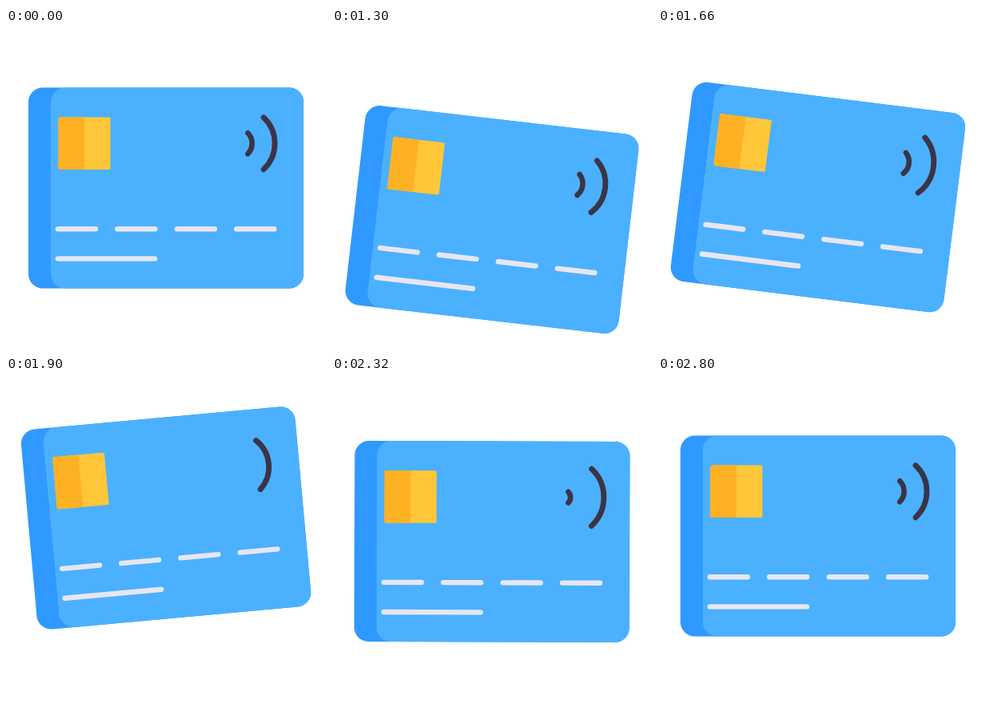
Recreate the animation shown at these times as an HTML page. Size 400 px wide and 400 px high, loop 2.83 s.

```html
<!DOCTYPE html>
<html>
<head>
<meta charset="utf-8">
<title>Card</title>
<style>
  html, body { margin: 0; width: 100%; height: 100%; overflow: hidden; background: #fff; }
  svg { display: block; width: 100%; height: 100%; }
</style>
</head>
<body>
<svg viewBox="0 0 400 400">
  <g id="card">
    <rect x="28" y="74.5" width="344" height="251" rx="18" fill="#3099ff"/>
    <rect x="56" y="74.5" width="316" height="251" rx="18" fill="#4bb1fe"/>
    <rect x="65.5" y="111.5" width="65" height="65.5" rx="2" fill="#ffc63a"/>
    <path d="M98 111.5H67.5a2 2 0 0 0-2 2v61.5a2 2 0 0 0 2 2H98z" fill="#ffb124"/>
    <g fill="none" stroke-linecap="round">
      <path d="M65 251.3H112M139.3 251.3H186.3M213.8 251.3H260.8M288.2 251.3H335.2M65 288.4H186" stroke="#e7e6f2" stroke-width="6.4"/>
      <g stroke="#3b3447">
        <path id="small"/>
        <path id="large"/>
      </g>
    </g>
  </g>
</svg>
<script>
const LOOP = 2830, STEP = 30;
const $ = id => document.getElementById(id);

// Smooth curve through [time, value] points that is flat at every peak.
function curve(points) {
  const slope = i => (points[i + 1][1] - points[i][1]) / (points[i + 1][0] - points[i][0]);
  const tangents = points.map((_, i) => {
    if (i === 0 || i === points.length - 1) return 0;
    const a = slope(i - 1), b = slope(i);
    return a * b > 0 ? 2 * a * b / (a + b) : 0;
  });
  return t => {
    if (t <= points[0][0]) return points[0][1];
    const i = points.findIndex(p => p[0] >= t) - 1;
    if (i < 0) return points[points.length - 1][1];
    const [t0, v0] = points[i], [t1, v1] = points[i + 1];
    const h = t1 - t0, u = (t - t0) / h, w = 1 - u;
    return v0 * (1 + 2 * u) * w * w + tangents[i] * h * u * w * w
         + v1 * u * u * (3 - 2 * u) - tangents[i + 1] * h * u * u * w;
  };
}

const drop = curve([[1000, 0], [1030, .7], [1300, 39.5], [1390, 42], [1540, 34], [1660, 11.5],
  [1900, -22.5], [1920, -23], [2080, -10], [2320, 7], [2410, 9], [2620, 1.8], [2800, 0]]);
const tilt = curve([[1000, 0], [1030, .1], [1300, 6.6], [1480, 8.3], [1570, 8.2], [1660, 7.1],
  [1900, -5.2], [1970, -6.1], [2080, -5.2], [2320, .2], [2420, .5], [2620, .4], [2800, 0]]);
const smallScale = curve([[1660, 1], [1870, 0], [2200, 0], [2320, .52], [2560, 1]]);
const largeScale = curve([[1480, 1], [1660, 1.07], [1900, .945], [2320, 1.1], [2620, 1]]);

// Arc bulging right, scaled about the point (origin, 144.3); the stroke keeps its width.
function wave(id, scale, origin, x, half, radius, width) {
  const px = origin + (x - origin) * scale, h = half * scale, r = radius * scale;
  const el = $(id);
  el.setAttribute("d", `M${px} ${144.3 - h}A${r} ${r} 0 0 1 ${px} ${144.3 + h}`);
  el.setAttribute("stroke-width", width * Math.min(1, scale * 2));
  el.style.display = scale > .02 ? "" : "none";
}

function draw() {
  const now = performance.now() % LOOP;
  const t = Math.floor((now - 10) / STEP) * STEP + 10;
  $("card").setAttribute("transform", `translate(0 ${drop(t)}) rotate(${tilt(t)} 200 200)`);
  wave("small", smallScale(t), 287.4, 302.3, 13, 18.6, 6.6);
  wave("large", largeScale(t), 300, 322, 32.5, 44.7, 6.8);
  requestAnimationFrame(draw);
}
draw();
</script>
</body>
</html>
```
